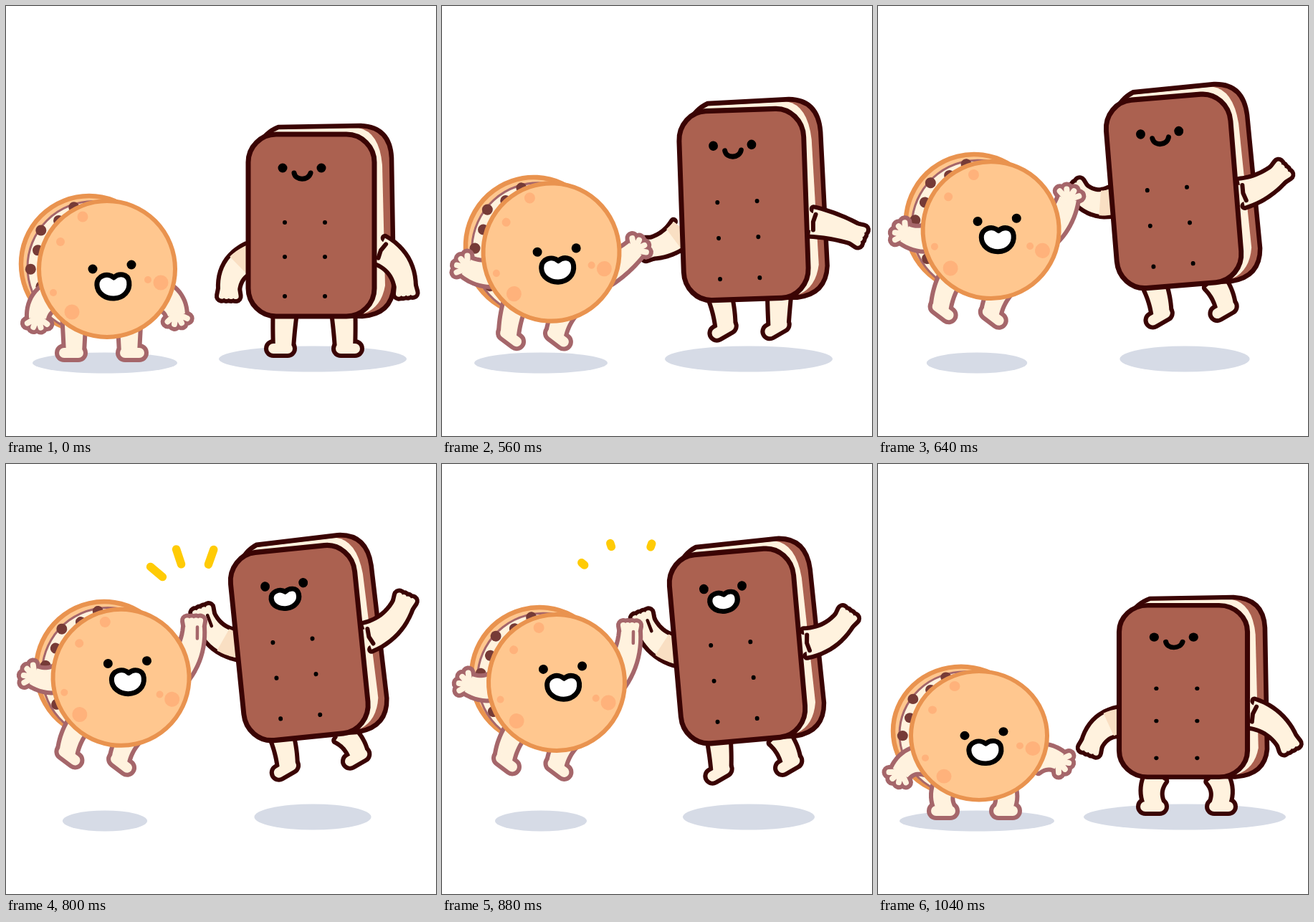
An HTML page with a canvas for the animation above (1.12 s loop, 600 by 600 pixels).

```html
<!DOCTYPE html>
<html lang="en">
<head>
<meta charset="utf-8">
<title>Cookie high five</title>
<style>
html, body { margin: 0; width: 100%; height: 100%; overflow: hidden; background: #fff; }
canvas { display: block; }
</style>
</head>
<body>
<canvas id="stage" width="600" height="600"></canvas>
<script>
const ctx = document.getElementById('stage').getContext('2d');
const LOOP = 1120, RAD = Math.PI / 180, INK = 6;
const CREAM = '#fff2de', TAN = '#f9dfc3', DARK = '#3a0404', BROWN = '#ab6150',
  MAUVE = '#a5666a', CRUST = '#e9934f', DOUGH = '#ffc78f', SPOT = '#ffb27b', CHIP = '#763b37';

// Key poses: 0 rest, 1 squat, 2 rise, 3 clap, 4 settle.
// Each step: start time, two key poses and the blend between them.
const steps = [
  [0, 0, 0, 0], [400, 1, 1, 0], [560, 2, 2, 0], [640, 2, 3, .6], [720, 3, 3, 0],
  [800, 3, 4, .45], [880, 4, 4, 0], [960, 4, 2, .85], [1040, 1, 1, 0]
];

// One entry per pose. body: centre x, y, turn, stretch. Hands: x, y, bow of the arm.
// kick: how far the left and right foot swing sideways from the hip.
const shrug = [[0], [3], [10], [45], [38]];
const tall = {
  line: DARK, ground: 478, reach: 42, toes: 150,
  shoulders: [[-84, 45], [95, 34]], hips: [[-37, 125], [45, 125]],
  body: [[426, 306, 0, 1], [426, 317, 0, .943], [421, 277, -2, 1.04], [407, 246, -6.4, 1.035], [412, 254, -5, 1.04]],
  shadow: [[131], [141], [117], [73], [92]],
  leftHand: [[311, 396, 18], [298, 391, 18], [292, 338, -10], [272, 207, -20], [282, 220, -16]],
  rightHand: [[557, 392, -18], [571, 387, -14], [576, 318, -4], [548, 178, 16], [562, 217, 14]],
  kick: [[-2, 2], [-2, 4], [7, -1], [11, 30], [3, 19]]
};
const round = {
  line: MAUVE, ground: 484, reach: 49, toes: 37,
  shoulders: [[-75, 37], [75, 37]], hips: [[-46, 70], [31, 70]],
  body: [[141, 367, 0, 1], [141, 379, 0, .945], [152.5, 343.5, 3, 1.012], [161, 292, 10.5, 1], [160, 305, 7, 1]],
  shadow: [[101], [108], [93], [55], [64]],
  faceLift: [[0], [0], [0], [19], [18]],
  leftHand: [[44, 436, 12], [31, 431, 12], [34, 364, -10], [39, 287, -14], [37, 307, -14]],
  rightHand: [[238, 431, -10], [253, 415, -10], [270, 339, 4], [262, 222, 14], [262, 234, 14]],
  kick: [[0, 0], [0, 2], [-10, -21], [-19, -22], [-19, -23]]
};

// All shapes below are drawn around the centre of their body.
const tallBack = new Path2D('M-74-111Q-64-130-46-137L69-139Q110-137 112-94L115 86Q112 124 71 127L-26 124Z');
const tallFilling = new Path2D('M-54-134L66-136Q95-130 99-84L103 84Q98 114 74 123L-26 114Z');
const tallFront = new Path2D();
tallFront.roundRect(-88, -127, 176, 254, 39);
const smile = new Path2D('M-24-73C-22-62-4-62-1-73');
const laugh = new Path2D('M1-12C-7-20-23-16-23-3C-23 9-12 17 0 17C13 17 23 8 22-5C21-17 8-18 1-12Z');

function paint(path, fill, stroke, width) {
  if (fill) { ctx.fillStyle = fill; ctx.fill(path); }
  if (stroke) { ctx.strokeStyle = stroke; ctx.lineWidth = width; ctx.stroke(path); }
}

function oval(x, y, rx, ry, fill, stroke, width) {
  const path = new Path2D();
  path.ellipse(x, y, rx, ry, 0, 0, Math.PI * 2);
  paint(path, fill, stroke, width);
}

const dot = (x, y, r, fill) => oval(x, y, r, r, fill);

function polyline(points) {
  const path = new Path2D();
  points.forEach(p => path.lineTo(...p));
  return path;
}

function within(x, y, turn, scaleX, scaleY, draw) {
  ctx.save();
  ctx.translate(x, y);
  ctx.rotate(turn * RAD);
  ctx.scale(scaleX, scaleY);
  draw();
  ctx.restore();
}

// A bowed limb: edge(t, offset) is the point at t along it, offset sideways.
function bone([x0, y0], [x1, y1], bow) {
  const dx = x1 - x0, dy = y1 - y0, length = Math.hypot(dx, dy);
  const cx = (x0 + x1) / 2 - dy / length * bow, cy = (y0 + y1) / 2 + dx / length * bow;
  const mix = (a, b, t) => a + (b - a) * t;
  const angle = t => Math.atan2(mix(cy - y0, y1 - cy, t), mix(cx - x0, x1 - cx, t));
  const edge = (t, offset) => [
    mix(mix(x0, cx, t), mix(cx, x1, t), t) - Math.sin(angle(t)) * offset,
    mix(mix(y0, cy, t), mix(cy, y1, t), t) + Math.cos(angle(t)) * offset
  ];
  return { edge, angle };
}

// Tapering band along a bone, open at the body end.
function ribbon(edge, wide, narrow, until = 1) {
  const side = sign => Array.from({ length: 13 }, (_, i) => {
    const t = i / 12 * until;
    return edge(t, sign * (wide + (narrow - wide) * t));
  });
  return polyline([...side(1), ...side(-1).reverse()]);
}

// Band and digits share one outline; shade tints the part near the body.
function drawLimb(band, digits, thickness, line, shade) {
  paint(band, null, line, INK * 2);
  paint(digits, null, line, thickness + INK * 2);
  paint(band, CREAM);
  if (shade) paint(shade, TAN);
  paint(digits, null, CREAM, thickness);
}

const polar = ([x, y], angle, r) => [x + Math.cos(angle) * r, y + Math.sin(angle) * r];

function drawArm(who, get, side, { fan, gap, length, shaded, palmLine }) {
  const [cx, cy] = get(who.body), [sx, sy] = who.shoulders[side];
  const [x, y, bow] = get(side ? who.rightHand : who.leftHand);
  const { edge, angle } = bone([cx + sx, cy + sy - get(shrug)[0]], [x, y], bow);
  const fingers = new Path2D();
  for (const i of [-1.5, -.5, .5, 1.5]) {
    const base = edge(1, i * gap);
    fingers.addPath(polyline([base, polar(base, angle(1) + i * fan, length)]));
  }
  drawLimb(ribbon(edge, 18, 12), fingers, 8, who.line, shaded && ribbon(edge, 18, 16, .35));
  if (palmLine) {
    const top = edge(1, 5);
    paint(polyline([top, polar(top, angle(1), -16)]), null, who.line, 4.5);
  }
  return edge;
}

function drawLeg(who, get, side, airborne) {
  const [cx, cy, turn, stretch] = get(who.body), [hx, hy] = who.hips[side];
  const kick = get(who.kick)[side], sin = Math.sin(turn * RAD), cos = Math.cos(turn * RAD);
  const hip = [cx + hx * cos - hy * stretch * sin, cy + hx * sin + hy * stretch * cos];
  const foot = [hip[0] + kick, airborne ? hip[1] + Math.sqrt(who.reach ** 2 - kick ** 2) : who.ground];
  const squat = Math.max(0, 1 - stretch) * 210 * (side ? -1 : 1);
  const toes = (airborne ? who.toes : side ? 0 : 180) * RAD;
  const { edge } = bone(hip, foot, squat - kick * .35);
  drawLimb(ribbon(edge, 13.5, 11), polyline([polar(foot, toes, -6), polar(foot, toes, 14)]), 14, who.line);
}

function drawTall(get, airborne, clapping) {
  const [x, y, turn, stretch] = get(tall.body);
  const onBody = draw => within(x, y, turn, 1 + (1 - stretch) * .3, stretch, draw);
  const hand = { fan: .12, gap: 5.5, length: 9 };
  drawLeg(tall, get, 0, airborne);
  drawLeg(tall, get, 1, airborne);
  drawArm(tall, get, 0, { ...hand, shaded: true, palmLine: clapping });
  onBody(() => {
    paint(tallBack, BROWN);
    paint(tallFilling, CREAM);
    paint(tallBack, null, DARK, 6.5);
  });
  const edge = drawArm(tall, get, 1, hand);
  paint(polyline([edge(.06, -11), edge(.03, 0), edge(.06, 11)]), null, DARK, INK);
  onBody(() => {
    paint(tallFront, BROWN, DARK, 7);
    for (const dx of [-37, 19]) for (const dy of [-4, 44, 99]) dot(dx, dy, 3, '#000');
    dot(-40, -80, 6.5, '#000');
    dot(14, -80, 6.5, '#000');
    if (clapping) within(-13, -61, -3, .87, .77, () => paint(laugh, '#fff', '#000', 8.5));
    else paint(smile, null, '#000', 7);
  });
}

function drawRound(get, airborne, clapping) {
  const [x, y, turn, stretch] = get(round.body);
  const splayed = { fan: .65, gap: 2, length: 13 }, flat = { fan: .12, gap: 5, length: 9, palmLine: true };
  within(x, y, turn, 1, stretch, () => {
    oval(-25, -7, 95, 95, DOUGH, CRUST, 6.5);
    oval(-19, -2.5, 92, 92, CREAM, MAUVE, 3);
    for (let i = 0; i < 7; i++) {
      const spot = polar([-25, -7], (135 + 20 * i) * RAD, i % 2 ? 74 : 82);
      dot(...spot, 7.5, CHIP);
    }
  });
  drawLeg(round, get, 0, airborne);
  drawLeg(round, get, 1, airborne);
  drawArm(round, get, 0, splayed);
  drawArm(round, get, 1, clapping ? flat : splayed);
  within(x, y, turn, 1, stretch, () => {
    oval(0, 0, 95, 95, DOUGH, CRUST, 6);
    for (const [dx, dy, r] of [[-34, -73, 7.5], [-65, -38, 6], [-75, 33, 5], [-49, 60, 10.5],
      [57, 15, 5], [75, 19, 10.5]]) dot(dx, dy, r, SPOT);
  });
  within(x + turn * .2, y - get(round.faceLift)[0], turn * .25, 1, stretch, () => {
    dot(-20, 0, 6.5, '#000');
    dot(34, -6, 6.5, '#000');
    within(9, 24, -3, 1, 1, () => paint(laugh, '#fff', '#000', 7));
  });
}

// Three rays fly outward from the hands and shorten as they go.
function drawSparks(burst) {
  const hands = [263, 195];
  for (const degrees of [-140, -108.5, -70.5]) {
    const ray = r => polar(hands, degrees * RAD, r);
    paint(polyline([ray(37 + 47 * burst), ray(73 + 16 * burst)]), null, '#ffcb05', 11.5);
  }
}

function draw(time) {
  const [, from, to, blend] = steps.findLast(step => step[0] <= time);
  const get = part => part[from].map((v, i) => v + (part[to][i] - v) * blend);
  const airborne = from > 1, clapping = from > 2 && to > 2;
  ctx.fillStyle = '#fff';
  ctx.fillRect(0, 0, 600, 600);
  ctx.lineCap = ctx.lineJoin = 'round';
  oval(138, 498, get(round.shadow)[0], 14.5, '#d6dbe6');
  oval(428, 492.5, get(tall.shadow)[0], 18, '#d6dbe6');
  drawTall(get, airborne, clapping);
  if (clapping) drawSparks(from - 3 + blend);
  drawRound(get, airborne, clapping);
}

const start = performance.now();
function tick() {
  draw((performance.now() - start) % LOOP);
  requestAnimationFrame(tick);
}
tick();
</script>
</body>
</html>
```
